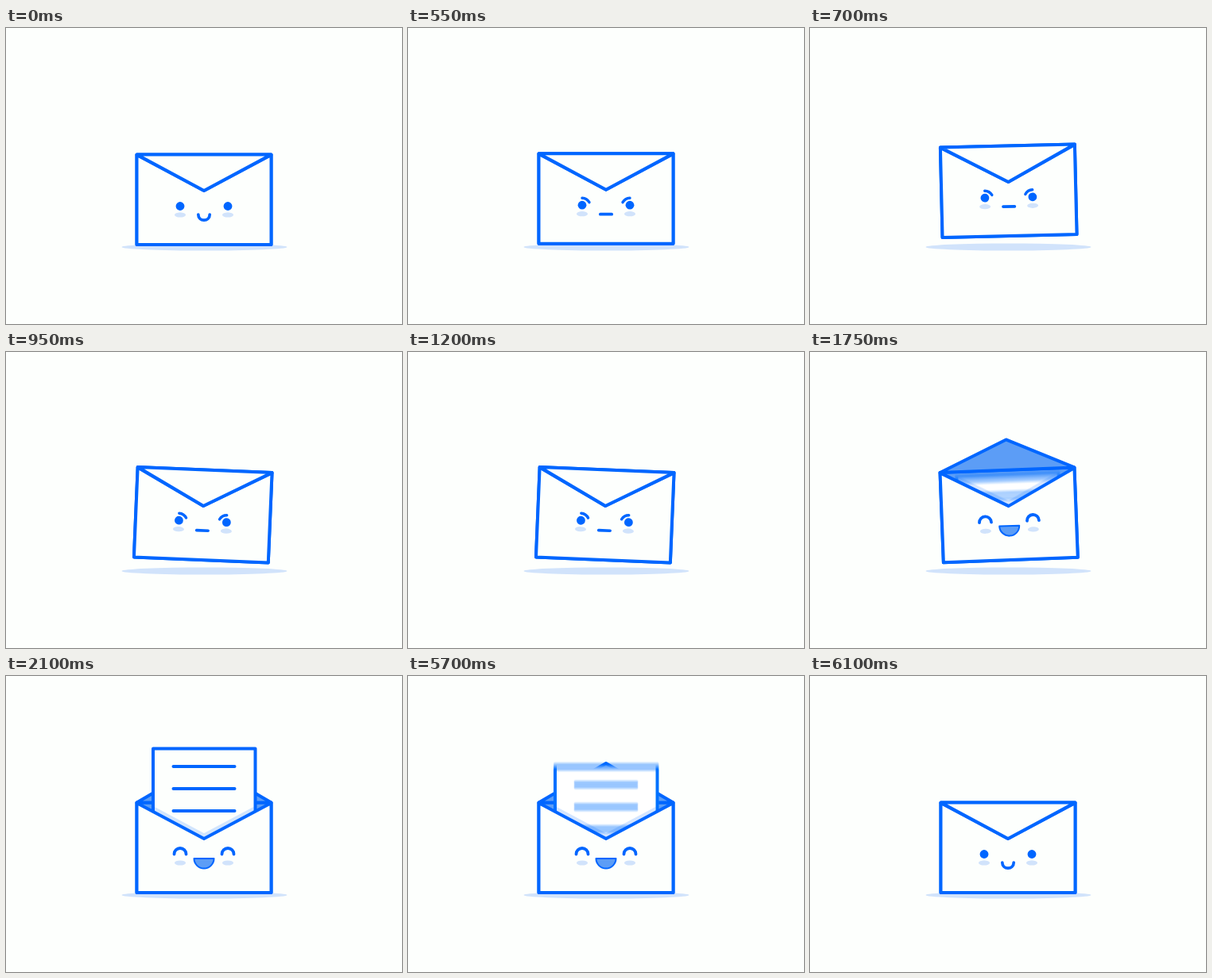
An HTML page with a canvas for the animation above (6550 ms loop, 498 by 373 pixels).

```html
<!DOCTYPE html>
<html lang="en">
<head>
<meta charset="utf-8">
<title>Happy envelope</title>
<style>
  html, body { margin: 0; width: 100%; height: 100%; overflow: hidden; background: #fdfffd; }
  canvas { display: block; width: 498px; height: 373px; }
</style>
</head>
<body>
<canvas id="stage"></canvas>
<script>
const W = 498, H = 373, LOOP = 6550, STEP = 50;
const BLUE = '#0066ff', MID = '#5c9df6', PALE = '#d1e3fb', WHITE = '#fdfffd';
const ratio = window.devicePixelRatio || 1;

function setup(canvas) {
  canvas.width = W * ratio;
  canvas.height = H * ratio;
  const c = canvas.getContext('2d');
  c.scale(ratio, ratio);
  c.lineCap = c.lineJoin = 'round';
  return c;
}
const ctx = setup(document.getElementById('stage'));
const sheet = document.createElement('canvas');
const pen = setup(sheet);

// Each track is a list of [time, value] keys.
const LIFT = [[520, 0], [660, 11], [1740, 11], [1880, 0], [1960, 2.5], [2060, 0]];
const DROP = [[1690, 115], [1880, -3], [1920, -3], [2090, 0], [5654, 0], [5884, 115]];
const TIP = [[1640, 205], [1780, 110], [5800, 110], [5980, 205]];
const ANGER = [[30, 0], [300, 1], [1700, 1], [1701, 0]];
const JOY = [[1600, 0], [1700, 1], [5920, 1], [6090, 0]];
const TILT = [0, .7, 1.5, -1.35, -.5, 2.1, -2.3, .3, 2.4, -2.7, .5, 2.2, -2.5, 2.36,
  -.4, -2.2, 2.6, .5, -2.05, 2.4, -.7, -2.6, 2.7, .6, -2.2, .8, 0]
  .map((v, i) => [550 + i * STEP, v]);

const linear = p => p;
const smooth = p => p * p * (3 - 2 * p);

function track(keys, t, ease = smooth) {
  if (t <= keys[0][0]) return keys[0][1];
  for (let i = 1; i < keys.length; i++) {
    const [t0, v0] = keys[i - 1], [t1, v1] = keys[i];
    if (t <= t1) return v0 + (v1 - v0) * ease((t - t0) / (t1 - t0));
  }
  return keys[keys.length - 1][1];
}

function shape(c, d, stroke, fill, width = 4) {
  const path = new Path2D(d);
  if (fill) { c.fillStyle = fill; c.fill(path); }
  if (stroke) { c.strokeStyle = stroke; c.lineWidth = width; c.stroke(path); }
}

function oval(x, y, rx, ry, fill) {
  ctx.beginPath();
  ctx.ellipse(x, y, rx, ry, 0, 0, Math.PI * 2);
  ctx.fillStyle = fill;
  ctx.fill();
}

function faded(alpha, draw) {
  if (alpha <= 0) return;
  ctx.save();
  ctx.globalAlpha = alpha;
  draw();
  ctx.restore();
}

function mirrored(draw) {
  draw();
  ctx.save();
  ctx.translate(W, 0);
  ctx.scale(-1, 1);
  draw();
  ctx.restore();
}

function drawSheet(y) {
  shape(pen, `M185 ${91.5 + y}H313.5V${216 + y}H185Z`, BLUE, WHITE);
  for (const row of [114, 142, 170]) shape(pen, `M210.5 ${row + y}H287.5`, BLUE);
}

// The sheet is averaged over a short shutter time.
function paper(t) {
  const pos = at => track(DROP, at, linear);
  const moving = pos(t - 10) !== pos(t + 10);
  const n = moving ? 16 : 1;
  pen.clearRect(0, 0, W, H);
  for (let i = 0; i < n; i++) {
    const at = moving ? t + ((i + .5) / n - .5) * 20 : t;
    layer(pos(at), 1 / n);
  }
  pen.globalCompositeOperation = 'source-atop';
  pen.save();
  pen.beginPath();
  pen.rect(187, 80, 124.5, 190);
  pen.clip();
  shape(pen, 'M164 155.5L249 201L334 155.5', 'rgba(0,102,255,.17)', null, 5);
  pen.restore();
  pen.globalCompositeOperation = 'source-over';

  ctx.save();
  ctx.beginPath();
  ctx.rect(0, 0, W, 270);
  ctx.clip();
  ctx.drawImage(sheet, 0, 0, W, H);
  ctx.restore();
}

const scratch = document.createElement('canvas');
const scratchPen = setup(scratch);
function layer(y, alpha) {
  const c = scratchPen;
  c.clearRect(0, 0, W, H);
  shape(c, `M185 ${91.5 + y}H313.5V${216 + y}H185Z`, BLUE, WHITE);
  for (const row of [114, 142, 170]) shape(c, `M210.5 ${row + y}H287.5`, BLUE);
  pen.save();
  pen.globalCompositeOperation = 'lighter';
  pen.globalAlpha = alpha;
  pen.drawImage(scratch, 0, 0, W, H);
  pen.restore();
}

function face(t) {
  const anger = track(ANGER, t), joy = track(JOY, t);
  mirrored(() => {
    oval(219, 235.5, 7, 3.1, PALE);
    faded(1 - joy, () => oval(219, 224.5, 5.4, 5.4, BLUE));
    faded(joy, () => shape(ctx, 'M211.5 224.5a7.5 7.5 0 0 1 15 0', BLUE, null, 3.8));
    faded(anger * (1 - joy), () => {
      const y = 212.5 + 3 * anger;
      shape(ctx, `M219 ${y}q6 .2 9 5.5`, BLUE, null, 3.4);
    });
  });
  faded(1 - joy, () => {
    const y = 235 + anger, h = 9.5 * (1 - anger);
    shape(ctx, `M241.8 ${y}c0 ${h} 14.4 ${h} 14.4 0`, BLUE, null, 3.7);
  });
  faded(joy, () => {
    const h = 12.5 * joy;
    shape(ctx, `M236.5 230H261.5A12.5 ${h} 0 0 1 236.5 230Z`, BLUE, MID, 2);
  });
}

function render(t) {
  const tip = track(TIP, t), open = tip < 159.5;
  const flap = fill => shape(ctx, `M164.5 159.5L249 ${tip}L333.5 159.5Z`, BLUE, fill);

  ctx.fillStyle = WHITE;
  ctx.fillRect(0, 0, W, H);
  oval(249.5, 276, 104, 4.6, PALE);

  ctx.save();
  ctx.translate(249, 186 - track(LIFT, t));
  ctx.rotate(track(TILT, t) * Math.PI / 180);
  ctx.translate(-249, -186);

  shape(ctx, 'M164.5 159.5H333.5V273H164.5Z', BLUE, MID);
  if (open) flap(MID);
  if (track(DROP, t, linear) < 115) paper(t);
  shape(ctx, 'M164.5 160L249 205L333.5 160V273H164.5Z', BLUE, WHITE);
  if (!open) flap(WHITE);
  face(t);
  ctx.restore();
}

const start = performance.now();
function tick() {
  const t = (performance.now() - start) % LOOP;
  render(Math.floor(t / STEP) * STEP);
  requestAnimationFrame(tick);
}
tick();
</script>
</body>
</html>
```
